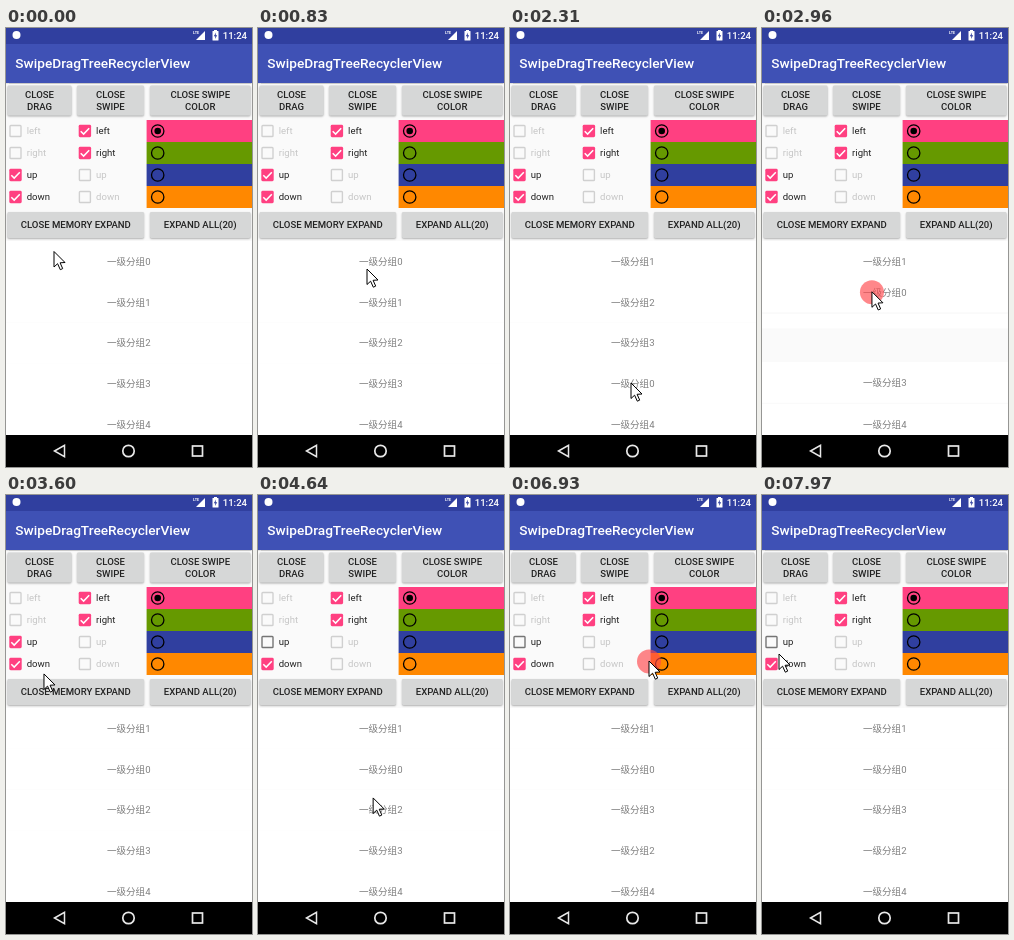
An HTML page with a canvas for the animation above (8 s loop, 246x439 px).

```html
<!DOCTYPE html>
<html lang="en">
<head>
<meta charset="utf-8">
<title>Drag and swipe list</title>
<style>
  html, body { margin: 0; height: 100%; overflow: hidden; background: #fafafa; }
  canvas { display: block; width: 246px; height: 439px; }
</style>
</head>
<body>
<canvas></canvas>
<script>
const W = 246, H = 439, LOOP = 8000;
const LIST_TOP = 213, LIST_BOTTOM = 407, ROW = 40.75, SETTLE = 250;
const PINK = '#ff4081', INK = '#222';

const canvas = document.querySelector('canvas');
const ratio = window.devicePixelRatio || 1;
canvas.width = W * ratio;
canvas.height = H * ratio;
const ctx = canvas.getContext('2d');
ctx.scale(ratio, ratio);

const clamp = v => Math.max(0, Math.min(1, v));
const easeOut = v => 1 - (1 - clamp(v)) ** 2;
const easeInOut = v => (1 - Math.cos(Math.PI * clamp(v))) / 2;
const mix = (a, b, v) => a + (b - a) * v;
const slotTop = slot => LIST_TOP + slot * ROW;

// The pointer rests between glides and slows down towards the end of each.
const glide = (start, end, x, y) => ({ start, end, x, y });
const glides = [
  glide(70, 830, 109, 241),
  glide(1133, 1524, 114, 358),
  glide(1760, 1820, 118, 365),
  glide(1850, 2060, 121, 355),
  glide(2630, 3090, 109, 256),
  glide(3130, 3400, 105, 275),
  glide(3460, 3745, 15, 146),
  glide(4310, 4720, 119, 309),
  glide(4880, 5440, 131, 371),
  glide(5720, 5860, 131, 330),
  glide(6180, 6370, 129, 319),
  glide(6550, 6930, 139, 166),
  glide(7080, 7330, 139, 229),
  glide(7450, 7970, 17, 159)
];

const press = (down, up) => ({ down, up });
const uncheckUp = press(3880, 4140);
const presses = [press(970, 1830), press(2370, 3130), uncheckUp, press(4760, 5720), press(6310, 7260)];

function pointerAt(t) {
  return glides.reduce((p, g) => {
    const v = easeOut((t - g.start) / (g.end - g.start));
    return { x: mix(p.x, g.x, v), y: mix(p.y, g.y, v) };
  }, { x: 48, y: 223.5 });
}

function dragOffset({ down }, t) {
  const offset = pointerAt(t).y - pointerAt(down).y;
  return t > uncheckUp.up ? Math.max(0, offset) : offset;
}

// Replays every press on the list: a row dragged by a full row height swaps with its neighbour.
function replayDrags() {
  const order = [0, 1, 2, 3, 4], moves = [];
  for (const { down, up } of presses) {
    const from = Math.floor((pointerAt(down).y - LIST_TOP) / ROW);
    if (from < 0) continue;
    const drag = { item: order[from], from, to: from, at: down, down, up };
    moves.push(drag);
    for (let t = down; t < up; t += 5) {
      const slot = from + Math.trunc(dragOffset(drag, t) / ROW);
      if (slot === drag.to) continue;
      const item = order[slot];
      moves.push({ item, from: slot, to: drag.to, at: t });
      order[drag.to] = item;
      order[slot] = drag.item;
      drag.to = slot;
    }
  }
  return moves;
}
const moves = replayDrags();

function rowAt(item, t) {
  const move = moves.filter(m => m.item === item && m.at <= t).pop();
  if (!move) return { item, top: slotTop(item), lifted: false };
  const dragged = 'up' in move;
  const settleStart = dragged ? move.up : move.at;
  const offset = dragged ? dragOffset(move, Math.min(t, move.up)) : 0;
  const top = mix(slotTop(move.from) + offset, slotTop(move.to), easeInOut((t - settleStart) / SETTLE));
  return { item, top, lifted: dragged && Math.abs(top - slotTop(move.to)) > .5 };
}

function box(x, y, w, h, color, radius = 0) {
  ctx.fillStyle = color;
  ctx.beginPath();
  ctx.roundRect(x, y, w, h, radius);
  ctx.fill();
}

function disc(x, y, r, color) {
  ctx.fillStyle = color;
  ctx.beginPath();
  ctx.arc(x, y, r, 0, 7);
  ctx.fill();
}

function ring(x, y, r, color, width) {
  ctx.strokeStyle = color;
  ctx.lineWidth = width;
  ctx.beginPath();
  ctx.arc(x, y, r, 0, 7);
  ctx.stroke();
}

function shape(points, close) {
  ctx.beginPath();
  points.forEach(([x, y]) => ctx.lineTo(x, y));
  if (close) ctx.closePath();
}

function label(text, x, y, color, { size = 9.57, weight = 400, align = 'left' } = {}) {
  ctx.font = `${weight} ${size}px Roboto, "Noto Sans CJK SC", "Noto Sans CJK", sans-serif`;
  ctx.textAlign = align;
  ctx.fillStyle = color;
  ctx.fillText(text, x, y);
}

function withShadow(alpha, blur, offset, draw) {
  ctx.save();
  ctx.shadowColor = `rgba(0,0,0,${alpha})`;
  ctx.shadowBlur = blur * ratio;
  ctx.shadowOffsetY = offset * ratio;
  draw();
  ctx.restore();
}

function button(x, y, w, h, ...lines) {
  withShadow(.3, 2, 1, () => box(x, y, w, h, '#d6d7d7', 1.4));
  const first = y + h / 2 + 3.4 - (lines.length - 1) * 5.6;
  lines.forEach((line, i) =>
    label(line, x + w / 2, first + i * 11.2, INK, { weight: 500, align: 'center' }));
}

function checkbox(x, y, text, state) {
  if (state === 'on') {
    box(x, y - 6.2, 12.4, 12.4, PINK, 1.4);
    ctx.strokeStyle = '#fff';
    ctx.lineWidth = 1.5;
    shape([[x + 2, y + .2], [x + 4.9, y + 3.1], [x + 10.5, y - 2.8]]);
  } else {
    ctx.strokeStyle = state === 'off' ? '#757575' : '#d0d0d0';
    ctx.lineWidth = 1.4;
    ctx.beginPath();
    ctx.roundRect(x + .7, y - 5.5, 11, 11, .8);
  }
  ctx.stroke();
  label(text, x + 17.4, y + 3.4, state === 'disabled' ? '#c6c6c6' : INK);
}

function drawBars() {
  box(0, 0, W, 16, '#303f9f');
  withShadow(.2, 1, .5, () => box(0, 16, W, 39, '#3f51b5'));
  disc(10.5, 7, 4, '#fff');
  label('LTE', 187, 5.5, '#fff', { size: 3.8, weight: 700 });
  ctx.fillStyle = '#fff';
  shape([[199, 3], [199, 12], [190, 12]], true);
  ctx.fill();
  box(206.5, 3, 6, 9.5, '#fff', .6);
  box(208, 2, 3, 1.5, '#fff');
  ctx.fillStyle = '#303f9f';
  shape([[210, 4.5], [207.8, 8.2], [209.3, 8.2], [209, 11], [211.2, 7.2], [209.7, 7.2]], true);
  ctx.fill();
  label('11:24', 241, 10.7, '#fff', { weight: 500, align: 'right' });
  label('SwipeDragTreeRecyclerView', 9.3, 39.5, '#fff', { size: 13.67, weight: 500 });

  box(0, LIST_BOTTOM, W, H - LIST_BOTTOM, '#000');
  ctx.strokeStyle = '#e8e8e8';
  ctx.lineWidth = 1.5;
  shape([[48.5, 423], [58.5, 417.3], [58.5, 428.7]], true);
  ctx.stroke();
  ring(122.5, 423, 5.7, '#e8e8e8', 1.7);
  ctx.strokeRect(186.5, 418, 10, 10);
}

function drawControls(t) {
  button(1.5, 57.5, 64, 30, 'CLOSE', 'DRAG');
  button(71, 57.5, 67, 30, 'CLOSE', 'SWIPE');
  button(144, 57.5, 100.5, 30, 'CLOSE SWIPE', 'COLOR');
  button(1.5, 184, 136.5, 26, 'CLOSE MEMORY EXPAND');
  button(144, 184, 100.5, 26, 'EXPAND ALL(20)');

  const dragStates = ['disabled', 'disabled', t < uncheckUp.up ? 'on' : 'off', 'on'];
  const swipeStates = ['on', 'on', 'disabled', 'disabled'];
  const colors = [PINK, '#669900', '#303f9f', '#ff8800'];
  ['left', 'right', 'up', 'down'].forEach((name, i) => {
    const y = 103 + i * 22;
    checkbox(3.3, y, name, dragStates[i]);
    checkbox(72.7, y, name, swipeStates[i]);
    box(140.6, y - 11, W - 140.6, 22, colors[i]);
    ring(151.7, y, 6.2, '#000', 1.3);
  });
  disc(151.7, 103, 3.3, '#000');
}

function drawRow({ item, top, lifted }) {
  withShadow(lifted ? .07 : 0, 1, .5, () => box(0, top, W, ROW, '#fff'));
  label('一级分组' + item, W / 2 - .3, top + ROW / 2 + 3.6, '#808080', { align: 'center' });
}

function drawList(t) {
  ctx.save();
  ctx.beginPath();
  ctx.rect(0, LIST_TOP - 1, W, LIST_BOTTOM - LIST_TOP + 1);
  ctx.clip();
  [0, 1, 2, 3, 4].map(item => rowAt(item, t))
    .sort((a, b) => a.lifted - b.lifted)
    .forEach(drawRow);
  ctx.restore();
}

function drawPointer(t) {
  const { x, y } = pointerAt(t);
  if (presses.some(({ down, up }) => t >= down && t < up)) {
    disc(x, y + .5, 12, 'rgba(255,70,75,.65)');
  }
  ctx.save();
  ctx.translate(x, y);
  shape([[0, 0], [0, 15.5], [3.6, 12.2], [6.3, 18.2], [8.7, 17.1], [6.1, 11.3], [11, 11]], true);
  ctx.fillStyle = '#fff';
  ctx.fill();
  ctx.strokeStyle = '#000';
  ctx.lineWidth = 1;
  ctx.stroke();
  ctx.restore();
}

function frame(now) {
  const t = now % LOOP;
  box(0, 0, W, H, '#fafafa');
  drawControls(t);
  drawList(t);
  drawBars();
  drawPointer(t);
  requestAnimationFrame(frame);
}
requestAnimationFrame(frame);
</script>
</body>
</html>
```
